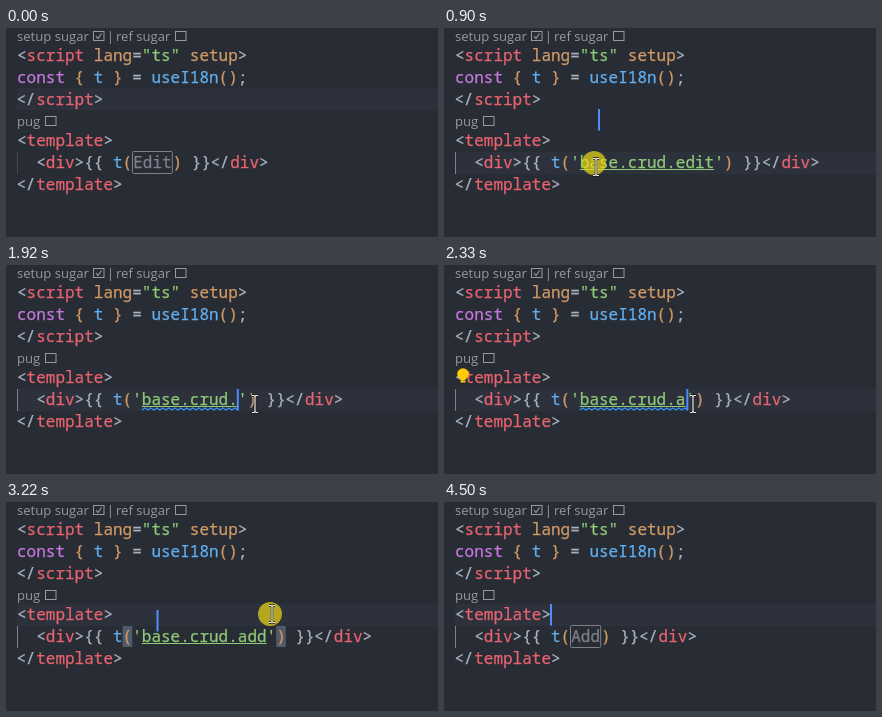
Write an HTML page that moves like this. It is 432 px wide and 209 px high and loops after 4980 ms.

```html
<!DOCTYPE html>
<html lang="en">
<head>
<meta charset="utf-8">
<title>Inline translation editing</title>
<style>
html, body { margin: 0; width: 100%; height: 100%; overflow: hidden; background: #282c34; }
svg { display: block; width: 432px; height: 209px; }
text { white-space: pre; }
.code { font: 500 16px "Noto Sans Mono", "DejaVu Sans Mono", monospace; }
.lens { font: 13.1px "Open Sans", "Noto Sans", sans-serif; fill: #999; }
.item { font: 600 17.8px "Noto Sans Mono", "DejaVu Sans Mono", monospace; fill: #d7dae0; }
.hint { font: 11.5px "Noto Sans CJK SC", "Noto Sans CJK", "DejaVu Sans", sans-serif; fill: #686d77; }
</style>
</head>
<body>
<svg id="stage" viewBox="0 0 432 209"></svg>
<script>
const LOOP = 4980, CHAR = 9.6, LEFT = 11, ROW = 22;
const SCRIPT_TOP = 60, TEMPLATE_TOP = 102, DIV_TOP = 124;
const INK = '#abb2bf', RED = '#e8636f', ORANGE = '#d19a66', GREEN = '#8fca78',
  BLUE = '#61afef', PURPLE = '#c678dd';
const stage = document.getElementById('stage');

const colX = col => LEFT + col * CHAR;
const escapeText = s => s.replace(/&/g, '&amp;').replace(/</g, '&lt;');
const rect = (x, y, w, h, fill, more = '') =>
  `<rect x="${x}" y="${y}" width="${w}" height="${h}" fill="${fill}" ${more}/>`;
const label = (cls, x, y, s) => `<text class="${cls}" x="${x}" y="${y}">${escapeText(s)}</text>`;

// Value of the last [time, value] pair that has been reached.
function latest(t, pairs) {
  let value;
  for (const [time, v] of pairs) if (t >= time) value = v;
  return value;
}

// Coloured runs on the character grid; the closing tag opener is a ligature.
function line(baseline, runs, x = LEFT) {
  let out = '';
  const put = (s, at, fill) => {
    out += `<tspan x="${at.toFixed(2)}" fill="${fill}" stroke="${fill}" stroke-width=".25">${escapeText(s)}</tspan>`;
  };
  for (const [s, fill = INK] of runs) {
    if (s === '</') {
      put('<', x - 0.5, fill);
      put('/', x + CHAR * 0.92, fill);
    } else put(s, x, fill);
    x += s.length * CHAR;
  }
  return `<text class="code" y="${baseline}">${out}</text>`;
}

const tick = (x, y, on) =>
  rect(x, y + 0.5, 10.5, 9, 'none', 'stroke="#999"') +
  (on ? `<path d="M${x + 2.5} ${y + 5}l2 2.5 3.5-5" fill="none" stroke="#999" stroke-width="1.2"/>` : '');

const staticCode =
  label('lens', 11, 13, 'setup sugar') + tick(87.5, 3, true) +
  label('lens', 100.8, 13, '|') + label('lens', 110, 13, 'ref sugar') + tick(169.5, 3) +
  line(33, [['<'], ['script', RED], [' lang', ORANGE], ['='], ['"ts"', GREEN], [' setup', ORANGE], ['>']]) +
  line(55, [['const', PURPLE], [' { ', ORANGE], ['t', BLUE], [' } ', ORANGE], ['= '],
    ['useI18n', BLUE], ['()', ORANGE], [';']]) +
  line(77, [['</'], ['script', RED], ['>']]) +
  label('lens', 11, 98, 'pug') + tick(39.5, 88) +
  line(118, [['<'], ['template', RED], ['>']]) +
  line(162, [['</'], ['template', RED], ['>']]);

const head = [['  <'], ['div', RED], ['>'], ['{{ '], ['t', BLUE], ['(', ORANGE]];
const tail = [[')', ORANGE], [' }}'], ['</'], ['div', RED], ['>']];

function foldedLine(word) {
  const x = colX(12), w = word.length * CHAR + 2;
  return line(140, head) + line(140, [[word, '#7b808a']], x + 1) +
    `<rect x="${x + 0.3}" y="123.5" width="${w - 0.6}" height="22" rx="1" fill="none" stroke="#7b808a"/>` +
    line(140, tail, x + w);
}

function wave(x0, x1) {
  let d = `M${x0} 145`;
  for (let x = x0, up = true; x < x1; x += 3, up = !up) d += `l3 ${up ? -2 : 2}`;
  return `<path d="${d}" fill="none" stroke="#3794ff" stroke-width="1.1"/>`;
}

function openLine(key, brackets, broken) {
  const end = 13 + key.length;
  const mark = col => rect(colX(col), DIV_TOP, CHAR, ROW - 1, '#515a6b');
  return (brackets ? mark(11) + mark(end + 1) : '') +
    line(140, [...head, ["'" + key + "'", GREEN], ...tail]) +
    rect(colX(13), 141, key.length * CHAR, 1, GREEN) +
    (broken ? wave(colX(13), colX(end)) : '');
}

function popup(tall) {
  const h = tall ? 70 : 47;
  return rect(261.5, 146.5, 190, h, '#21252b', 'stroke="#181a1f"') +
    rect(262, 147, 170, 23, '#2c313a') +
    rect(267.5, 152.5, 10.5, 11, 'none', 'rx="1" stroke="#d7dae0" stroke-width="1.2"') +
    '<path d="M270 155.5h6M270 158h6M270 160.5h4" stroke="#d7dae0"/>' +
    label('item', 284, 164, 'routerAddRoute') +
    (tall ? '' : label('hint', 269, 186, '插入 (⏎)'));
}

const bulb = '<circle cx="19" cy="109" r="5.8" fill="#ffcc00"/>' +
  rect(16.5, 113, 5, 2.5, '#ffcc00') + rect(16.5, 116, 5, 1.5, '#ffcc00');

// Pointer moves: start, end, number of steps, from, to, sag.
const moves = [
  [270, 760, 8, [284, 195], [152, 139], 0],
  [1170, 1650, 8, [152, 139], [249, 139], 4],
  [2880, 3150, 5, [249, 139], [266, 112], 0],
  [3890, 4170, 5, [266, 112], [156, 142], 0],
  [4370, 4440, 2, [240, 164], [415, 203], 0]
];
function pointerAt(t) {
  if (t < 270 || t >= 4500) return null;
  const i = moves.findLastIndex(m => t >= m[0]);
  const [a, b, n, from, to, sag] = moves[i];
  const k = Math.min(n - 1, Math.floor((t - a) / (b - a) * (n - 1) + 0.08));
  const jumpsIn = i === 0 || i === moves.length - 1;
  const u = jumpsIn ? k / (n - 1) : (k + 1) / n;
  const e = u * u * (3 - 2 * u);
  return [from[0] + (to[0] - from[0]) * e,
    from[1] + (to[1] - from[1]) * e + sag * Math.sin(Math.PI * u)];
}

function beam([x, y]) {
  const d = 'M-3-8.5h2l1 1 1-1h2M0-7.5v15M-3 8.5h2l1-1 1 1h2';
  return `<g transform="translate(${x.toFixed(1)} ${y.toFixed(1)})" fill="none">` +
    `<path d="${d}" stroke="#17191d" stroke-width="2.4"/><path d="${d}" stroke="#eee" stroke-width="1.2"/></g>`;
}

const halo = (x, y) => `<circle cx="${x}" cy="${y}" r="12" fill="#f0d814" opacity=".7"/>`;

function draw(t) {
  const within = (a, b) => t >= a && t < b;
  const caret = latest(t, [
    [0, null], [830, [108, 64]], [900, [155, 81]], [970, [colX(28), DIV_TOP]],
    [1720, [colX(27), DIV_TOP]], [1790, [colX(23), DIV_TOP]],
    [2330, [colX(24.2), DIV_TOP]], [2400, [colX(24), DIV_TOP]], [2470, [colX(25), DIV_TOP]],
    [2600, [colX(26), DIV_TOP]], [3220, [151.5, 108]], [3290, [colX(10), TEMPLATE_TOP]]
  ]);
  const key = 'base.crud.' + latest(t, [[0, 'edit'], [1790, ''], [2330, 'a'], [2470, 'ad'], [2600, 'add']]);
  const brackets = within(970, 1790) || within(2470, 3290);
  const open = within(830, 3490);
  const rowTop = latest(t, [[0, SCRIPT_TOP], [830, DIV_TOP], [3220, TEMPLATE_TOP]]);
  const pointer = pointerAt(t);

  let out = rect(0, 0, 432, 209, '#282c34');
  out += rect(LEFT, rowTop, 432 - LEFT, ROW, '#2c313c');
  out += rect(LEFT, DIV_TOP, 1, ROW, t < 830 ? '#434852' : '#7d838f') + staticCode;
  out += open ? openLine(key, brackets, within(1920, 2470)) : foldedLine(t < 830 ? 'Edit' : 'Add');
  if (within(2140, 3220)) out += bulb;
  if (caret) out += rect(caret[0] - 1, caret[1], 2, ROW - 0.5, '#528bff');
  if (within(2600, 3220)) out += popup(t < 2670);
  if (within(830, 970)) out += halo(150, 135);
  if (within(3220, 3360)) out += halo(264, 112);
  if (pointer) out += beam(pointer);
  return out;
}

let shown = '';
const start = performance.now();
function update() {
  const next = draw((performance.now() - start) % LOOP);
  if (next !== shown) stage.innerHTML = shown = next;
  requestAnimationFrame(update);
}
update();
</script>
</body>
</html>
```
